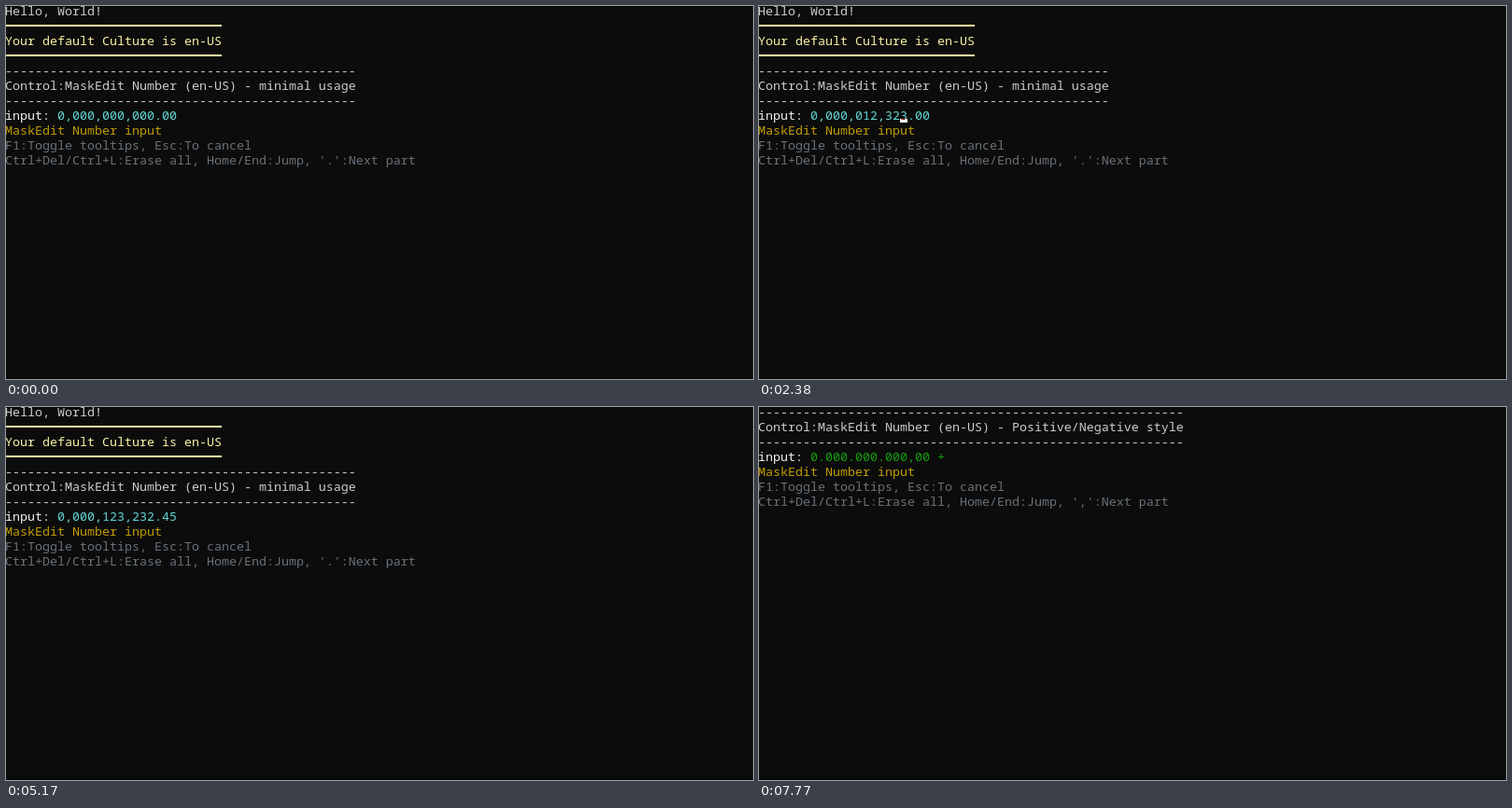
These frames come from a looping animation (800x400 px, 8000 ms). An HTML page:

```html
<!DOCTYPE html>
<html lang="en">
<head>
<meta charset="utf-8">
<title>Number mask input</title>
<style>
html, body { margin: 0; width: 100%; height: 100%; overflow: hidden; background: #0c0c0c; }
#stage { position: relative; width: 800px; height: 400px; overflow: hidden; background: #0c0c0c; }
pre {
  position: absolute; left: -1px; top: -3px; margin: 0; color: #ccc;
  font: 13.3333px/16px "Noto Sans Mono", "DejaVu Sans Mono", monospace;
  font-variant-ligatures: none;
}
pre div { height: 16px; white-space: pre; }
.rule { position: absolute; left: 0; width: 231px; height: 2px; background: #f9f1a5; }
#cursor { position: absolute; width: 8px; height: 4px; background: #fff; mix-blend-mode: difference; }
#edge { position: absolute; left: 0; top: 398px; width: 800px; height: 2px; background: #060606; }
.yellow { color: #f9f1a5; }
.white { color: #f2f2f2; }
.cyan { color: #61d6d6; }
.green { color: #13a10e; }
.gold { color: #c19c00; }
.gray { color: #69727a; }
</style>
</head>
<body>
<div id="stage">
  <pre id="screen"></pre>
  <div id="rules">
    <div class="rule" style="top:20px"></div>
    <div class="rule" style="top:52px"></div>
  </div>
  <div id="cursor"></div>
  <div id="edge"></div>
</div>
<script>
const LOOP = 8000, NEXT_SCREEN = 7370;
const UNITS = 19, TENTHS = 21, CENTS = 22; // cursor columns

// [time, integer digits, decimals, cursor column or 0 when hidden]
const steps = [
  [0, "", "00", 0],
  [390, "", "00", UNITS],
  [990, "", "00", 0],
  [1580, "1", "00", UNITS],
  [1780, "12", "00", UNITS],
  [1980, "123", "00", UNITS],
  [2180, "1232", "00", UNITS],
  [2380, "12323", "00", UNITS],
  [2570, "123232", "00", UNITS],
  [2970, "123232", "00", 0],
  [3170, "123232", "00", TENTHS],
  [3370, "123232", "40", CENTS],
  [3570, "123232", "45", CENTS],
  [4160, "123232", "45", 0],
  [4770, "123232", "45", CENTS],
  [5170, "123232", "45", 0],
  [5570, "123232", "45", CENTS],
  [5770, "123232", "45", 0],
  [6170, "123232", "45", CENTS],
  [6960, "123232", "45", 0],
  [NEXT_SCREEN, "", "00", UNITS],
  [7770, "", "00", 0]
];

const $ = id => document.getElementById(id);
const span = (color, text) => `<span class="${color}">${text}</span>`;

function mask(digits, decimals, group, point) {
  const whole = digits.padStart(10, "0").replace(/\B(?=(\d{3})+$)/g, group);
  return whole + point + decimals;
}

function control(style, number, point) {
  const title = "Control:MaskEdit Number (en-US) - " + style;
  const line = "-".repeat(title.length);
  return [
    line, title, line,
    span("white", "input: ") + number,
    span("gold", "MaskEdit Number input"),
    span("gray", "F1:Toggle tooltips, Esc:To cancel"),
    span("gray", `Ctrl+Del/Ctrl+L:Erase all, Home/End:Jump, '${point}':Next part`)
  ];
}

let shown;
function draw(now) {
  const t = now % LOOP;
  const step = steps.findLast(s => s[0] <= t);
  if (step !== shown) {
    shown = step;
    const [time, digits, decimals, column] = step;
    const second = time >= NEXT_SCREEN;
    const rows = second
      ? control("Positive/Negative style", span("green", mask(digits, decimals, ".", ",") + " +"), ",")
      : ["Hello, World!", "", span("yellow", "Your default Culture is en-US"), "",
         ...control("minimal usage", span("cyan", mask(digits, decimals, ",", ".")), ".")];
    $("screen").innerHTML = rows.map(r => `<div>${r}</div>`).join("");
    $("rules").hidden = second;
    const cursor = $("cursor");
    cursor.hidden = !column;
    cursor.style.left = column * 8 - 1 + "px";
    cursor.style.top = (second ? 57 : 121) + "px";
  }
  requestAnimationFrame(draw);
}
draw(0);
</script>
</body>
</html>
```
